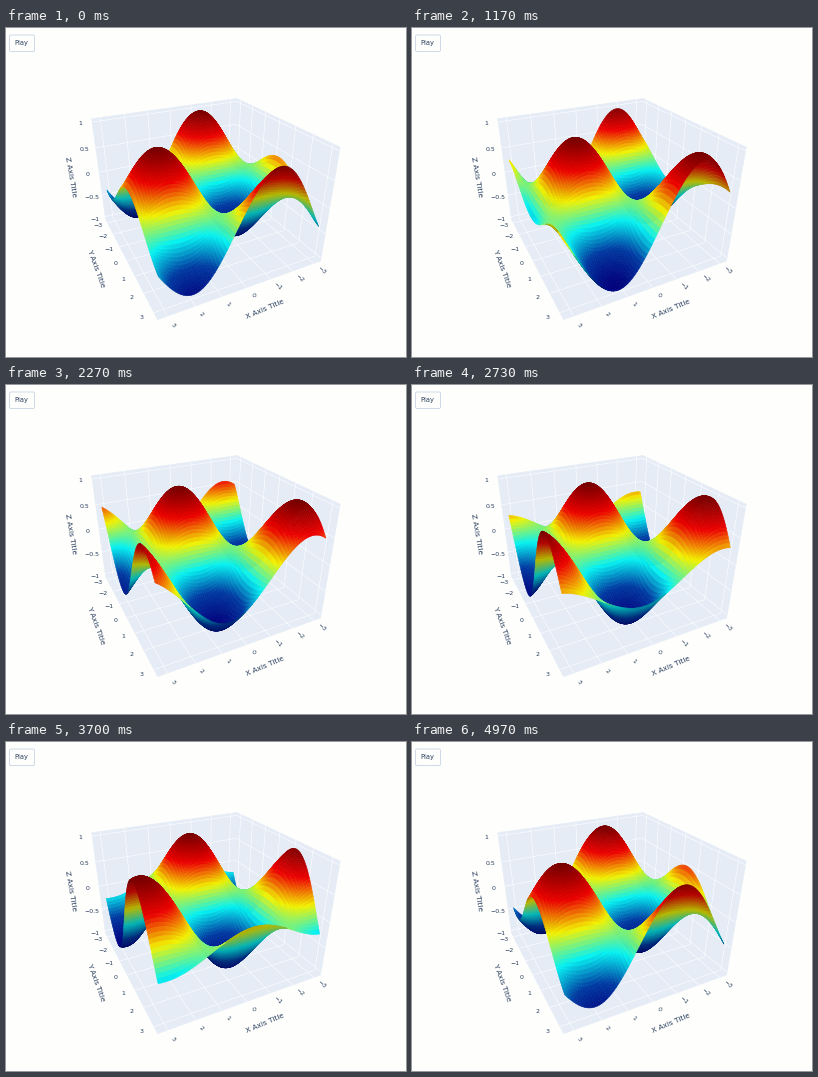
A matplotlib script for the animation above (5010 ms loop, 400 px wide and 329 px high).

```python
import numpy as np
import matplotlib.pyplot as plt
from matplotlib.animation import FuncAnimation
from matplotlib.collections import LineCollection, PolyCollection
from matplotlib.colors import LinearSegmentedColormap
from matplotlib.patches import FancyBboxPatch

W, H, DPI = 400, 329, 100
FRAMES, INTERVAL = 167, 30
PHASE, RATE = -0.417, 0.000608      # radians, radians per ms

PAGE = "#fefefc"
PANE = "#e5ecf6"
INK = "#2a3f5f"

# Scene units: the box is 2 x 2 wide, each side padded by 1/32 of the range
HALF = np.pi * 17 / 16
TOP = 0.705
ZSCALE = TOP * 16 / 17
FOCAL, CENTER, DIST = 397, (198.5, 160.8), 4.65
AZ, ELEV = np.arctan2(0.895, 0.446), np.radians(28)

toward = np.array([np.cos(AZ) * np.cos(ELEV), np.sin(AZ) * np.cos(ELEV), np.sin(ELEV)])
right = np.array([-np.sin(AZ), np.cos(AZ), 0])
up = np.cross(toward, right)
EYE = DIST * toward


def project(points):
    p = np.asarray(points, float)
    scale = FOCAL / (DIST - p @ toward)
    return np.stack([CENTER[0] + p @ right * scale,
                     CENTER[1] - p @ up * scale], axis=-1)


JET = LinearSegmentedColormap.from_list("jet6", [
    "#000083", "#003caa", "#05ffff", "#ffff00", "#fa0000", "#800000"], N=512)

fig = plt.figure(figsize=(W / DPI, H / DPI), dpi=DPI, facecolor=PAGE)
ax = fig.add_axes([0, 0, 1, 1])
ax.set(xlim=(0, W), ylim=(H, 0))
ax.axis("off")


def label(x, y, text, size, angle=0):
    ax.text(x, y, text, fontsize=size * 72 / DPI, rotation=angle, color=INK,
            family="DejaVu Sans", ha="center", va="center",
            rotation_mode="anchor", zorder=5)


def draw_box():
    floor = [(1, 1, -TOP), (-1, 1, -TOP), (-1, -1, -TOP), (1, -1, -TOP)]
    back = [(1, -1, -TOP), (-1, -1, -TOP), (-1, -1, TOP), (1, -1, TOP)]
    side = [(-1, 1, -TOP), (-1, -1, -TOP), (-1, -1, TOP), (-1, 1, TOP)]
    ax.add_collection(PolyCollection(project([floor, back, side]), facecolors=PANE,
                                     edgecolors=PANE, linewidths=0.3, zorder=1))
    grid = []
    for v in np.arange(-3, 4) / HALF:
        grid += [[(v, 1, -TOP), (v, -1, -TOP)], [(v, -1, -TOP), (v, -1, TOP)],
                 [(1, v, -TOP), (-1, v, -TOP)], [(-1, v, -TOP), (-1, v, TOP)]]
    for z in np.linspace(-ZSCALE, ZSCALE, 5):
        grid += [[(1, -1, z), (-1, -1, z)], [(-1, -1, z), (-1, 1, z)]]
    ax.add_collection(LineCollection(project(grid), colors="white",
                                     linewidths=0.4, zorder=2))


def draw_labels():
    for n in range(-3, 4):
        text, v = str(n).replace("-", "\u2212"), n / HALF
        label(*project((v, 1.13, -TOP)), text, 6.3, -45)
        label(*project((1.13, v, -TOP)), text, 6.3)
    for z in np.linspace(-1, 1, 5):
        label(*project((1.14, -1, z * ZSCALE)), f"{z:g}".replace("-", "\u2212"), 6.3)
    label(259.5, 281, "X Axis Title", 7.4, 23)
    label(90, 240, "Y Axis Title", 7.4, -70)
    label(65, 149, "Z Axis Title", 7.4, -80)


def draw_button():
    ax.add_patch(FancyBboxPatch((3.5, 7), 25, 16.5, boxstyle="round,pad=0,rounding_size=1.5",
                                facecolor=PAGE, edgecolor="#c8d4e3", linewidth=0.6))
    label(15.2, 15, "Play", 6.6)


draw_box()
draw_labels()
draw_button()

# Ascending x and y runs from far to near, so cells paint in grid order
NX, NY = 70, 96
xs = np.linspace(-np.pi, np.pi, NX + 1)
ys = np.linspace(-np.pi, np.pi, NY + 1)
X, Y = np.meshgrid(xs, ys)
MX, MY = np.meshgrid((xs[:-1] + xs[1:]) / 2, (ys[:-1] + ys[1:]) / 2)

surface = PolyCollection([], linewidths=0.4, zorder=3)
ax.add_collection(surface)


def wave(x, y, p):
    return np.sin(x + p) * np.cos(y + p)


def place(x, y, p):
    return np.stack([x / HALF, y / HALF, ZSCALE * wave(x, y, p)], axis=-1)


def shade(p):
    """Full light on the upper side, dimmer where the underside shows."""
    slope = ZSCALE * HALF
    normal = np.stack([-slope * np.cos(MX + p) * np.cos(MY + p),
                       slope * np.sin(MX + p) * np.sin(MY + p),
                       np.ones_like(MX)], axis=-1)
    facing = np.sum(normal * (EYE - place(MX, MY, p)), axis=-1)
    return np.where(facing > 0, 0.95, 0.72)


def update(i):
    p = PHASE + RATE * i * INTERVAL
    q = project(place(X, Y, p))
    quads = np.stack([q[:-1, :-1], q[:-1, 1:], q[1:, 1:], q[1:, :-1]], axis=2)
    colors = JET((wave(MX, MY, p) + 1) / 2)
    colors[..., :3] *= shade(p)[..., None]
    colors = colors.reshape(-1, 4)
    surface.set_verts(quads.reshape(-1, 4, 2))
    surface.set_facecolor(colors)
    surface.set_edgecolor(colors)
    return [surface]


anim = FuncAnimation(fig, update, frames=FRAMES, interval=INTERVAL,
                     init_func=lambda: update(0), repeat=True, repeat_delay=0)
plt.show()
```
